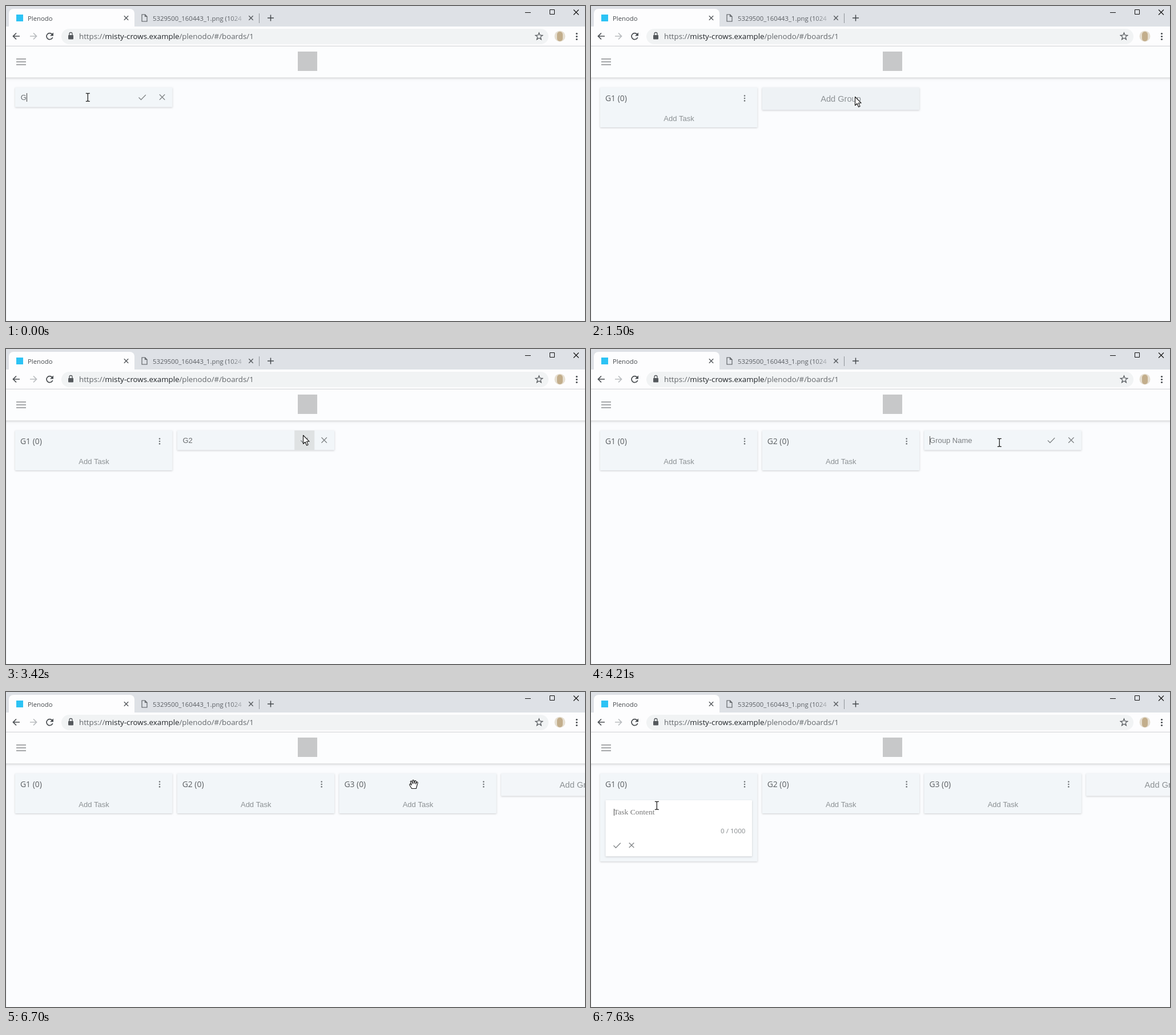
Animation of 1014 by 553 pixels, one loop 8 s. Source, as an HTML page with a canvas:

```html
<!DOCTYPE html>
<html lang="en">
<head>
<meta charset="utf-8">
<title>Task board</title>
<style>
html, body { margin: 0; width: 100%; height: 100%; overflow: hidden; background: #fbfcfe; }
canvas { display: block; }
</style>
</head>
<body>
<canvas id="stage" width="1014" height="553"></canvas>
<script>
const ctx = document.getElementById('stage').getContext('2d');
const LOOP = 8000;
const UI = '"Open Sans", "Noto Sans", sans-serif';
const ARIAL = '"Liberation Sans", Arial, sans-serif';
const SERIF = '"Liberation Serif", "Times New Roman", serif';
const CARD = '#f2f6f9';

// time, finished groups, typed text (null = button), caret visible
const STATES = [
  [0, 0, 'G', true], [120, 0, 'G', false], [400, 0, 'G1', true],
  [670, 1, null, false],
  [1770, 1, '', true], [2330, 1, '', false], [2480, 1, 'G', true],
  [2730, 1, 'G2', true], [3300, 1, 'G2', false],
  [3540, 2, null, false],
  [4210, 2, '', true], [4780, 2, '', false], [5170, 2, 'G', true],
  [5550, 2, 'G3', true],
  [6070, 3, null, false]
];

// time, cursor shape, x, y
const POINTER = [
  [0, 'beam', 143, 160], [1070, 'hand', 121, 151], [1230, 'hand', 186, 154],
  [1380, 'arrow', 340, 185], [1500, 'arrow', 462, 159], [1650, 'arrow', 459, 155],
  [1770, 'beam', 456, 150], [2880, 'arrow', 515, 180], [3000, 'arrow', 572, 200],
  [3150, 'arrow', 541, 163], [3300, 'arrow', 524, 156], [3420, 'arrow', 520, 151],
  [3540, 'hand', 520, 153], [3660, 'arrow', 605, 165], [3810, 'arrow', 744, 171],
  [3940, 'arrow', 726, 164], [4070, 'arrow', 715, 157], [4210, 'beam', 715, 164],
  [6200, 'hand', 712, 162], [6700, 'hand', 714, 162], [6850, 'arrow', 480, 188],
  [6970, 'arrow', 228, 201], [7120, 'arrow', 160, 218], [7240, 'arrow', 107, 192],
  [7390, 'arrow', 113, 196], [7630, 'beam', 115, 199]
];
const TASK_OPEN = 7510;
const TASK_CARET = 7630;

const at = (list, t) => list.filter(row => row[0] <= t).pop();
const columnX = i => 16 + 283.7 * i;

function box(x, y, w, h, color) {
  ctx.fillStyle = color;
  ctx.fillRect(x, y, w, h);
}

function pill(x, y, w, h, r, color) {
  ctx.fillStyle = color;
  ctx.beginPath();
  ctx.roundRect(x, y, w, h, r);
  ctx.fill();
}

function dot(x, y, r, color) {
  ctx.fillStyle = color;
  ctx.beginPath();
  ctx.arc(x, y, r, 0, Math.PI * 2);
  ctx.fill();
}

function stroke(d, color, width = 1, x = 0, y = 0) {
  ctx.save();
  ctx.translate(x, y);
  ctx.strokeStyle = color;
  ctx.lineWidth = width;
  ctx.stroke(new Path2D(d));
  ctx.restore();
}

function text(str, x, y, size, color, family = UI, align = 'left') {
  ctx.font = `${size}px ${family}`;
  ctx.fillStyle = color;
  ctx.textAlign = align;
  ctx.fillText(str, x, y);
  return ctx.measureText(str).width;
}

function raised(x, y, w, h, color) {
  ctx.save();
  ctx.shadowColor = 'rgba(0,0,0,.18)';
  ctx.shadowBlur = 3;
  ctx.shadowOffsetY = 1;
  pill(x, y, w, h, 1, color);
  ctx.restore();
}

const cross = (x, y, r, color, width) =>
  stroke(`M${-r} ${-r}L${r} ${r}M${r} ${-r}L${-r} ${r}`, color, width, x, y);
const tick = (x, y) => stroke('M-6 .5L-2 4.5L6.3 -4', '#808486', 1.25, x, y);
const caret = (x, y, h) => box(Math.round(x), y, 1, h, '#444');
const dots = (x, y, gap, r, color) =>
  [-gap, 0, gap].forEach(d => dot(x, y + d, r, color));

function drawTabs() {
  box(0, 0, 1014, 36, '#dee1e6');
  pill(5, 5, 220, 40, [8, 8, 0, 0], '#fdfdfe');
  box(18, 15, 12, 12, '#2cc3f5');
  text('Plenodo', 38, 25.5, 11.3, '#45494d');
  cross(210.5, 21, 3.7, '#55595d', 1.4);

  stroke('M.5 .5H6L9.5 4V12.5H.5ZM6 .5V4H9.5', '#55595d', 1.1, 237.5, 14.5);
  const fade = ctx.createLinearGradient(392, 0, 420, 0);
  fade.addColorStop(0, '#5a5e63');
  fade.addColorStop(1, 'rgba(90,94,99,.1)');
  text('5329500_160443_1.png (1024', 257, 25.5, 11.3, fade);
  cross(429, 21, 3.7, '#55595d', 1.4);
  box(443, 13, 1, 17, '#8f9398');
  stroke('M-5.5 0H5.5M0 -5.5V5.5', '#44484c', 1.5, 463.5, 21);

  box(909, 11, 10, 1, '#111');
  stroke('M.5 .5H8.5V8.5H.5Z', '#111', 1, 952, 6);
  cross(998.5, 11, 4.5, '#111', 1.1);
}

function drawToolbar() {
  box(0, 36, 1014, 34, '#fdfdfe');
  stroke('M6 0H-5.5M0 -5.5L-5.5 0L0 5.5', '#4b4f53', 1.7, 18, 53);
  stroke('M-6 0H5.5M0 -5.5L5.5 0L0 5.5', '#b9bcbf', 1.7, 48, 53);
  stroke('M4.2 -3.4A5.5 5.5 0 1 0 5.2 2', '#4b4f53', 1.7, 76.5, 53);
  ctx.fillStyle = '#4b4f53';
  ctx.fill(new Path2D('M83 46.5V52.5H77Z'));

  pill(97, 40, 853, 27, 13.5, '#f1f3f4');
  pill(109, 51, 9, 7.5, 1, '#55595d');
  stroke('M-2.5 3V0A2.5 2.5 0 0 1 2.5 0V3', '#55595d', 1.3, 113.5, 49);
  let x = 128;
  x += text('https://', x, 57.5, 13.3, '#62666a');
  x += text('misty-crows.example', x, 57.5, 13.3, '#202428');
  text('/plenodo/#/boards/1', x, 57.5, 13.3, '#62666a');

  let star = '';
  for (let i = 0; i < 10; i++) {
    const r = i % 2 ? 2.8 : 6.5, a = i * Math.PI / 5 - Math.PI / 2;
    star += `${i ? 'L' : 'M'}${r * Math.cos(a)} ${r * Math.sin(a)}`;
  }
  stroke(star + 'Z', '#55595d', 1.3, 933.5, 53.5);

  dot(970, 53, 9.5, '#e6dfd2');
  pill(965, 45, 10, 17, 5, '#c3ae8c');
  dots(999.5, 53.5, 5, 1.6, '#4b4f53');
}

function drawPage() {
  box(0, 71, 1014, 482, '#fbfcfe');
  box(0, 71, 1, 482, '#f1f2f4');
  ctx.save();
  ctx.shadowColor = 'rgba(0,0,0,.18)';
  ctx.shadowBlur = 4;
  ctx.shadowOffsetY = 1;
  box(-10, 71, 1034, 54.5, '#fcfdfe');
  ctx.restore();
  box(0, 70, 1014, 1, '#d5d7d9');
  [93, 98, 103].forEach(y => box(18, y - .7, 17, 1.5, '#8a8d8f'));
  box(511, 80, 34, 34, '#c7c8c9');
}

function drawGroup(i, open, t) {
  const x = columnX(i);
  raised(x, 143, 275.5, open ? 154.5 : 70, CARD);
  text(`G${i + 1} (0)`, x + 9, 166.7, 13.9, '#5b5f62');
  dots(x + 253, 162, 4.4, 1.3, '#73777a');
  if (!open) {
    text('Add Task', x + 138, 201.5, 13, '#8c9194', ARIAL, 'center');
    return;
  }
  raised(x + 9.5, 190, 256.5, 98.5, '#fff');
  text('Task Content', x + 24, 215, 13.5, '#777', SERIF);
  if (t >= TASK_CARET) caret(x + 24, 205, 12);
  text('0 / 1000', x + 254.5, 247.5, 11.6, '#85898c', UI, 'right');
  tick(x + 29.5, 269);
  cross(x + 55, 269, 4.3, '#808486', 1.3);
}

function drawButton(i, hover) {
  const x = columnX(i);
  raised(x, 143, 275.5, 39.5, hover ? '#eef2f5' : '#f3f6f9');
  text('Add Group', x + 137.8, 167.5, 14.6, '#8c9194', ARIAL, 'center');
}

function drawForm(i, typed, showCaret, hover) {
  const x = columnX(i);
  raised(x, 143, 275.5, 34.5, CARD);
  if (hover) box(x + 205.5, 143, 35, 34.5, '#dfe2e3');
  const left = x + 9.7;
  const w = text(typed || 'Group Name', left, 165, 13, typed ? '#686c6f' : '#7b7f82', ARIAL);
  if (showCaret) caret(left + (typed ? w : -.4), 153, 15);
  tick(x + 222.5, 160);
  cross(x + 257.5, 160, 4.7, '#808486', 1.3);
}

const cursors = {
  beam() {
    stroke('M-3.5 -7H-1L0 -6L1 -7H3.5M0 -6V6M-3.5 7H-1L0 6L1 7H3.5', '#222', 1.3, .3, .3);
  },
  arrow() {
    const p = new Path2D('M.5 .5V15.5L4 12.2L6.6 18.2L9.1 17.1L6.5 11.3H11.2Z');
    ctx.fillStyle = '#fff';
    ctx.fill(p);
    ctx.stroke(p);
  },
  hand() {
    const p = new Path2D('M-3.5 7.5L-7 1.5C-8 -.5 -5.8 -1.4 -4.6 .4L-3.8 1.3L-5.6 -4' +
      'C-6 -6 -3.8 -6.3 -3.2 -4.6L-1.8 -1L-2.2 -6C-2 -7.8 .2 -7.8 .4 -6L.8 -1.2L1.7 -5.5' +
      'C2.2 -7.1 4.2 -6.7 4.1 -5L3.6 -.6L5 -3.5C5.8 -4.9 7.5 -4 7.1 -2.4L5.4 3.5L4.3 7.5Z');
    ctx.fillStyle = '#fff';
    ctx.fill(p);
    ctx.stroke(p);
  }
};

function drawPointer(shape, x, y) {
  ctx.save();
  ctx.translate(x, y);
  ctx.strokeStyle = '#111';
  ctx.lineWidth = 1.1;
  ctx.lineJoin = 'round';
  cursors[shape]();
  ctx.restore();
}

function draw(t) {
  const [, count, typed, showCaret] = at(STATES, t);
  const [, shape, px, py] = at(POINTER, t);
  const dx = px - columnX(count);

  drawTabs();
  drawToolbar();
  drawPage();
  for (let i = 0; i < count; i++) drawGroup(i, i === 0 && t >= TASK_OPEN, t);
  if (typed === null) {
    drawButton(count, dx > 0 && dx < 275 && py < 183);
  } else {
    const overTick = shape === 'arrow' && dx > 205 && dx < 240 && py < 177;
    drawForm(count, typed, showCaret, overTick);
  }
  drawPointer(shape, px, py);
}

const start = performance.now();
function animate() {
  draw((performance.now() - start) % LOOP);
  requestAnimationFrame(animate);
}
animate();
</script>
</body>
</html>
```
